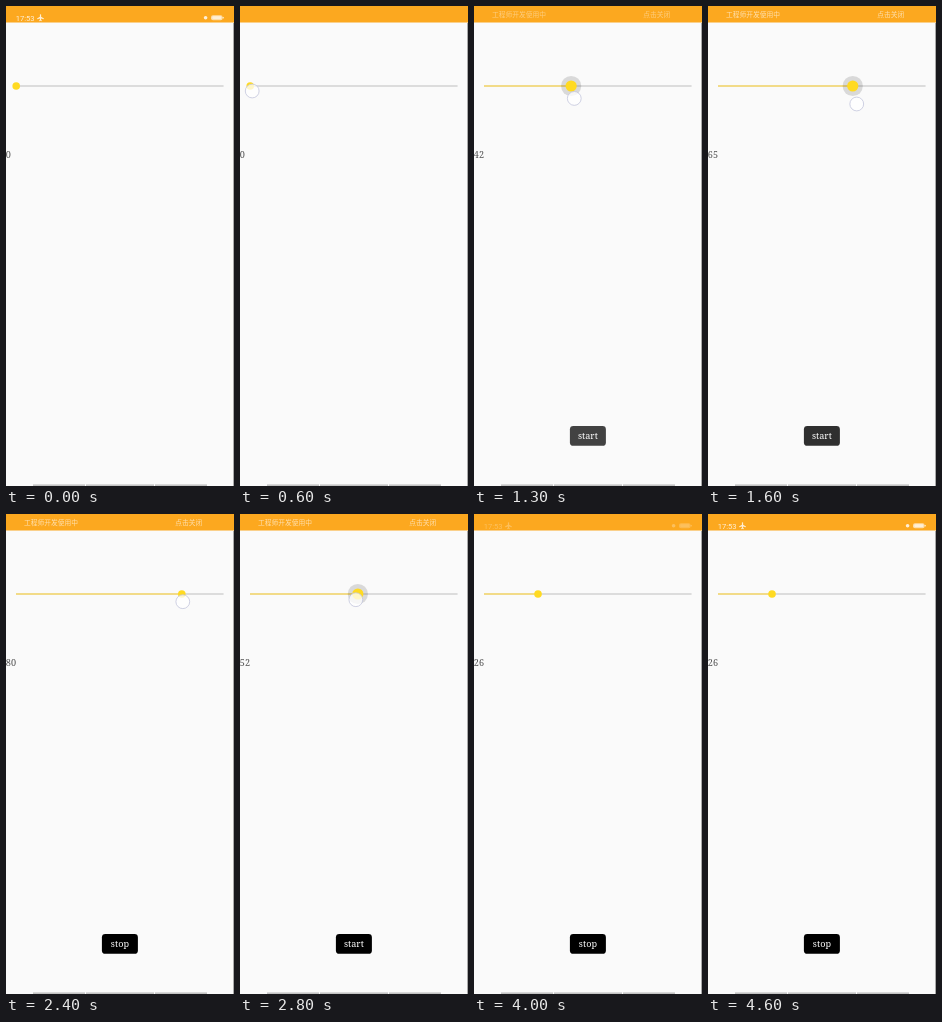
Write an HTML page that moves like this. It is 228 px wide and 480 px high and loops after 4.9 s.

```html
<!DOCTYPE html>
<html lang="zh">
<head>
<meta charset="utf-8">
<title>Slider</title>
<style>
  html, body { margin: 0; width: 100%; height: 100%; overflow: hidden; background: #fafafa; }
  svg { display: block; width: 228px; height: 480px; }
  .clock { font: 7.6px Roboto, sans-serif; }
  .notice { font: 6.75px "Noto Sans CJK SC", "Noto Sans CJK", sans-serif; }
  .value { font: 9.1px "Noto Serif", serif; fill: #505050; }
  .label { font: 500 9.1px "Noto Serif", serif; fill: #fff; text-anchor: middle; }
</style>
</head>
<body>
<svg viewBox="0 0 228 480">
  <rect width="228" height="480" fill="#fafafa"/>
  <rect x="227" y="17" width="1" height="463" fill="#aaa"/>
  <rect width="228" height="16.5" fill="#fca81f"/>

  <g id="status" fill="#fff">
    <text class="clock" x="9.7" y="14.6">17:53</text>
    <path d="M33.9 8.6q.6-.8 1.2 0v2.2l2.8 1.6v.8l-2.8-.8v1.6l.9.7v.5l-1.5-.4-1.5.4v-.5l.9-.7v-1.6l-2.8.8v-.8l2.8-1.6z"/>
    <circle cx="199.6" cy="11.8" r="1.8"/>
    <rect x="205" y="9.2" width="11.6" height="5" rx="2" opacity=".75"/>
    <rect x="206.3" y="10.3" width="9" height="2.8" rx="1"/>
    <rect x="216.9" y="10.8" width=".8" height="1.8" rx=".4"/>
  </g>
  <g id="notice" class="notice" fill="#fff">
    <text x="18" y="11.3">工程师开发使用中</text>
    <text x="169.3" y="11.3">点击关闭</text>
  </g>

  <rect x="10" y="79.4" width="207.6" height="1.2" fill="#c9c9c9"/>
  <rect id="fill" x="10" y="79.3" height="1.4" fill="#fddc66"/>
  <circle id="halo" cy="80" r="10.1" fill="#000"/>
  <circle id="thumb" cy="80" fill="#ffda22"/>
  <circle id="touch" r="6.9" fill="#fff" fill-opacity=".75" stroke="#c3c6dc" stroke-width=".8"/>

  <text id="value" class="value" x="-.2" y="151.8">0</text>

  <g id="toast">
    <rect id="panel" x="95.9" y="420.1" width="36" height="19.7" rx="3.4"/>
    <text id="label" class="label" x="113.9" y="432.8">start</text>
  </g>

  <g fill="#c2c2c2">
    <rect x="27" y="478.4" width="52" height="1.6"/>
    <rect x="80" y="478.4" width="68" height="1.6"/>
    <rect x="149" y="478.4" width="52" height="1.6"/>
  </g>
</svg>
<script>
const LOOP = 4900, STEP = 100;
const el = id => document.getElementById(id);
const set = (id, attrs) => {
  for (const key in attrs) el(id).setAttribute(key, attrs[key]);
};

const ramp = (t, from, to) => Math.min(1, Math.max(0, (t - from) / (to - from)));
const ease = (t, from, to) => {
  const u = ramp(t, from, to);
  return u * u * (3 - 2 * u);
};
const pulse = (t, a, b, c, d) => ramp(t, a, b) - ramp(t, c, d);

function draw(t) {
  // Two drags: right to 80, then back to 26.
  const value = Math.round(80 * ease(t, 560, 2000) - 54 * ease(t, 2400, 3180));
  const x = 10.2 + value * 2.07;
  const press = pulse(t, 700, 1000, 2100, 2300) + pulse(t, 2400, 2600, 3200, 3500);
  const finger = pulse(t, 500, 600, 2100, 2200) + pulse(t, 2300, 2400, 3100, 3200);
  const dragging = t < 2200 || (t >= 2500 && t < 3300);

  // The finger drifts away from the thumb and returns.
  const out = ramp(t, 900, 1600), back = ramp(t, 1600, 2400), low = ramp(t, 2400, 2800);

  set("status", { opacity: .82 * (1 - pulse(t, 0, 400, 3800, 4400)) });
  set("notice", { opacity: .64 * pulse(t, 700, 1600, 3000, 3400) });
  set("fill", { width: x - 10 });
  set("halo", { cx: x, opacity: .13 * press });
  set("thumb", { cx: x, r: 3.8 + 1.8 * press * press });
  set("touch", {
    cx: x + 2 + 2 * out - 3 * back - 3 * low,
    cy: 85 + 13 * out - 10.3 * back - 2 * low,
    opacity: finger
  });
  set("panel", { opacity: .68 * ramp(t, 700, 900) + .32 * ramp(t, 1100, 2300) });
  set("toast", { visibility: t > 700 ? "visible" : "hidden" });
  el("value").textContent = value;
  el("label").textContent = dragging ? "start" : "stop";
}

const start = performance.now();
function tick() {
  const t = (performance.now() - start) % LOOP;
  draw(Math.floor(t / STEP) * STEP);
  requestAnimationFrame(tick);
}
tick();
</script>
</body>
</html>
```
